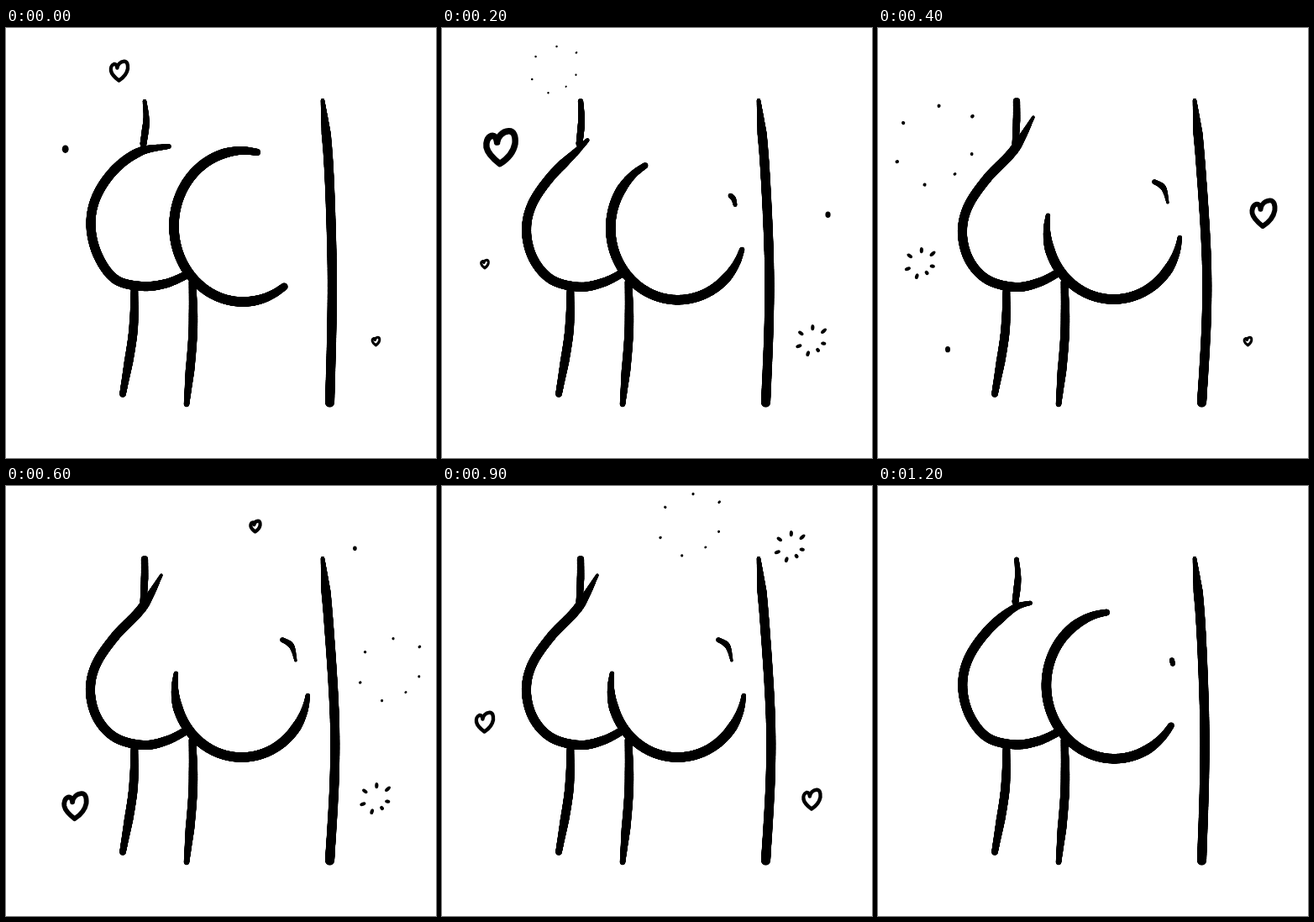
These frames come from a looping animation (512 by 512 pixels, 1.3 s). An HTML page with a canvas:

```html
<!DOCTYPE html>
<html lang="en">
<head>
<meta charset="utf-8">
<title>Doodle with hearts</title>
<style>
html, body { margin: 0; width: 100%; height: 100%; overflow: hidden; background: #fff; }
canvas { display: block; }
</style>
</head>
<body>
<canvas id="stage" width="512" height="512"></canvas>
<script>
const ctx = document.getElementById('stage').getContext('2d');
const STEP = 100, STEPS = 13, LIFT_STEPS = 4, TAPER = 40;
const RAD = Math.PI / 180;

// Left curve when round and when lifted, without its moving tip.
const leftRound = [[160,147], [130,168], [108,200], [101,234], [109,270], [130,299], [162,307.5], [191,304], [215,294]];
const leftLifted = [[162,145], [130,179], [107,213], [100.5,245], [109,277], [131,300], [165,308.5], [194,302], [215,291]];

// x, y, scale and the steps at which a new heart begins there
const hearts = [
  [135, 51, 1, [-2]], [70, 142, 1.7, [0]], [440.5, 373, 1, [-1, 3, 7]],
  [51, 281, 1, [1, 7]], [459, 220.5, 1.34, [2]], [82.5, 381, 1.31, [4]],
  [297, 48, 1.33, [5]], [415, 73, 1, [6]]
];
const heart = new Path2D('M-2.6-3.5C-3-7-4.5-8.5-6.5-8C-9.5-7-10.5-3-10 0C-9 5-4 9-.6 11.6C5 8 9 3 10-2.5C10.5-8 9-11.5 5.5-11.3C1-11-2-7.5-2.6-3.5');

// Directions (degrees) and relative reach of a bursting heart's bits.
const rays = [[-87,1], [-41,1.14], [11,.86], [56,.78], [108,.95], [160,1.02], [216,1]];

const mix = (a, b, t) => a + (b - a) * t;
const mixPoint = (p, q, t) => [mix(p[0], q[0], t), mix(p[1], q[1], t)];
const bezier = (p, q, r, t) => mixPoint(mixPoint(p, q, t), mixPoint(q, r, t), t);
const spline = (a, b, c, d, t) =>
  b + t / 2 * (c - a + t * (2 * a - 5 * b + 4 * c - d + t * (3 * (b - c) + d - a)));

function blob(x, y, rx, ry = rx, angle = 0) {
  ctx.beginPath();
  ctx.ellipse(x, y, rx, ry, angle, 0, 2 * Math.PI);
  ctx.fill();
}

// Smooth stroke whose ends narrow to the given fractions of its width.
function brush(points, width, startTip, endTip) {
  const last = points.length - 1;
  const at = i => points[Math.max(0, Math.min(last, i))];
  const taper = (x, y, end, tip) =>
    mix(tip, 1, Math.min(1, Math.hypot(x - end[0], y - end[1]) / TAPER));
  for (let i = 0; i < last; i++) {
    const count = Math.ceil(2 * Math.hypot(at(i + 1)[0] - at(i)[0], at(i + 1)[1] - at(i)[1]));
    for (let n = 0; n <= count; n++) {
      const [x, y] = [0, 1].map(k =>
        spline(at(i - 1)[k], at(i)[k], at(i + 1)[k], at(i + 2)[k], n / count));
      const narrow = Math.min(taper(x, y, at(0), startTip), taper(x, y, at(last), endTip));
      blob(x, y, width / 2 * narrow);
    }
  }
}

function arc(cx, cy, rx, ry, from, to, count = 24) {
  return Array.from({ length: count + 1 }, (_, i) => {
    const a = mix(from, to, i / count) * RAD;
    return [cx + rx * Math.cos(a), cy + ry * Math.sin(a)];
  });
}

// lift runs from 0 (round) to 1 (lifted).
function drawFigure(lift) {
  const early = 1 - (1 - lift) ** 2.5;
  brush([[165,87], [mix(167, 165, lift),110], [163.5,138]], 9, mix(.5, .9, lift), .85);

  const tip = bezier([194,141], [156,140], [185,106], lift);
  const left = leftRound.map((p, i) => mixPoint(p, leftLifted[i], early));
  brush([tip, ...left], 11, mix(.5, .3, lift), .85);

  const right = arc(mix(282, 280.5, early), mix(236, 239, early), mix(82, 79.5, early),
    mix(90, 84, early), mix(282, 191, lift), mix(53, 7, early));
  brush(right, 11.5, mix(.7, .45, lift), mix(.75, .45, early));

  const nub = (lift - .2) / .8;
  if (nub >= 0) {
    const from = mixPoint([350,207], [329,183], nub);
    const to = mixPoint([351,212], [345,208], nub);
    const [x, y] = mixPoint(from, to, .5);
    brush([from, [x + 3 * nub, y - 5 * nub], to], 10, .55, mix(.6, .3, lift));
  }

  brush([[153,312], [151,365], [139,436]], 10.5, .8, .7);
  brush([[222,302], [222.5,365], [215,448]], 10.5, .8, .6);
  const bow = 388 + 3 * lift;
  brush([[377,86], [384,160], [bow,270], [bow,350], [385.5,446]], 11, .4, 1);
}

function outline(scale, width) {
  ctx.scale(scale, scale);
  ctx.lineWidth = width;
  ctx.stroke(heart);
}

function burst(radius, length, width) {
  for (const [degrees, reach] of rays) {
    const a = degrees * RAD, r = radius * reach;
    blob(r * Math.cos(a), r * Math.sin(a), length * reach, width, a);
  }
}

// A heart's life: dot, small, full, seeds, specks.
const ages = [
  () => blob(.4, 1.3, 2.3, 2.8),
  () => outline(.42, 7.5),
  () => outline(1, 4.4),
  () => burst(16.3, 3.6, 2.1),
  () => burst(29, 1.3, 1.2)
];

function drawHeart([x, y, scale, births], step) {
  // A new heart waits until the one before it has gone.
  const show = births.map(birth => ages[step - birth]).find(Boolean);
  if (!show) return;
  ctx.save();
  ctx.translate(x, y);
  ctx.scale(scale, scale);
  show();
  ctx.restore();
}

function draw(step) {
  ctx.fillStyle = '#fff';
  ctx.fillRect(0, 0, 512, 512);
  ctx.fillStyle = ctx.strokeStyle = '#000';
  ctx.lineCap = ctx.lineJoin = 'round';
  const fromRound = Math.min(step, STEPS - step, LIFT_STEPS);
  drawFigure((fromRound / LIFT_STEPS) ** 1.15);
  hearts.forEach(spot => drawHeart(spot, step));
}

const start = performance.now();
let shown = -1;
function tick() {
  const step = Math.floor((performance.now() - start) / STEP) % STEPS;
  if (step !== shown) draw(shown = step);
  requestAnimationFrame(tick);
}
tick();
</script>
</body>
</html>
```
